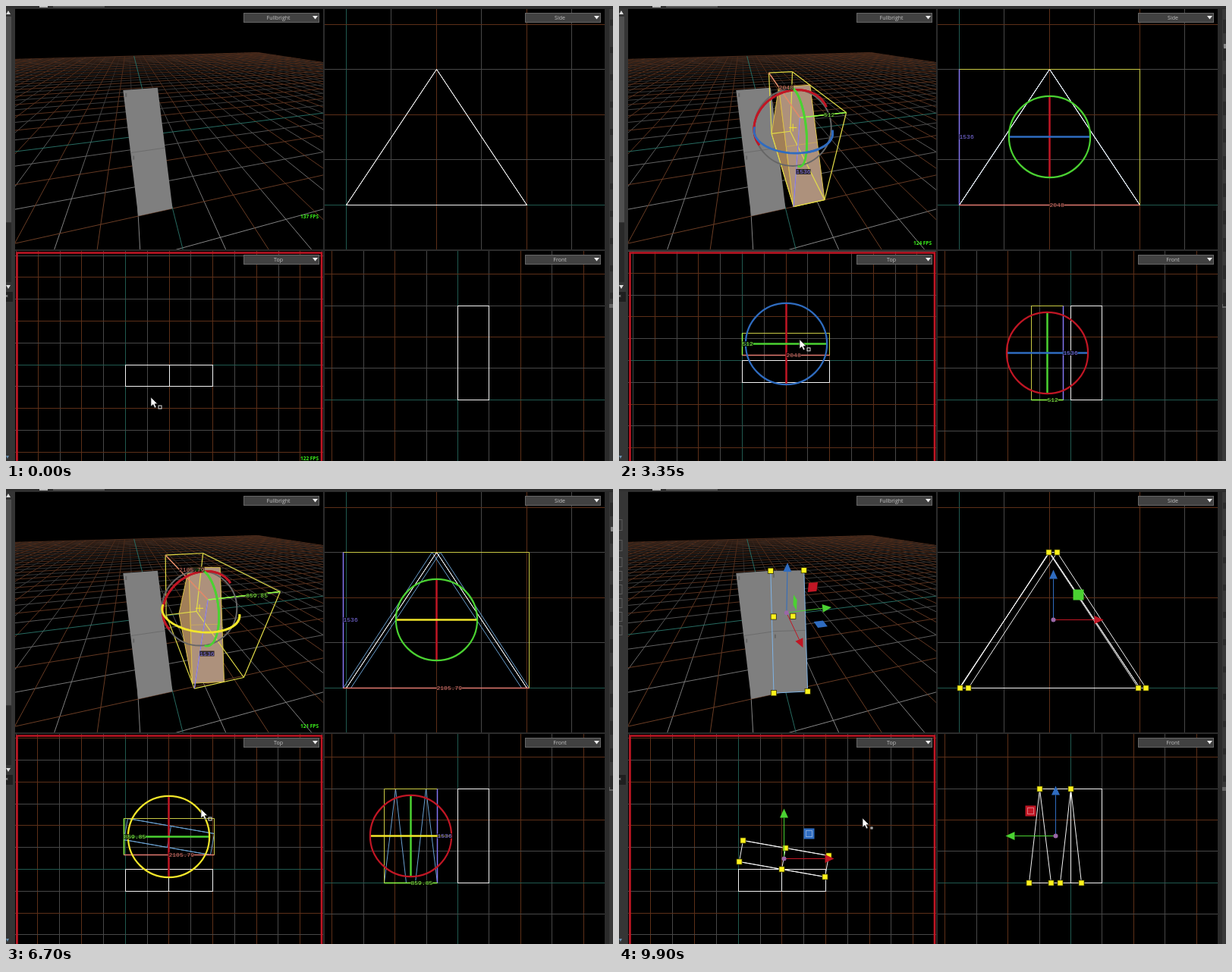
An HTML page with a canvas that plays this animation: 800x600 px, repeating every 9950 ms.

```html
<!DOCTYPE html>
<html>
<head>
<meta charset="utf-8">
<style>
html, body { margin: 0; width: 800px; height: 600px; overflow: hidden; background: #2b2b2b; }
canvas { display: block; }
</style>
</head>
<body>
<canvas id="stage" width="800" height="600"></canvas>
<script>
const g = document.getElementById('stage').getContext('2d');
const LOOP = 9950;
const RED = '#c01624', GREEN = '#4bd232', BLUE = '#2f6cc0', YELLOW = '#f2e62a';
const BOX = '#c9c944', SALMON = '#e27a70', LIME = '#8cff4a', VIOLET = '#8274f0';
const GRAY = '#474747', BROWN = '#5c2f18', TEAL = '#20594f';
const SANS = '7px "Open Sans", sans-serif', MONO = '8px "Liberation Mono", monospace';

// One world unit is one grid cell of 512.
const EDGES = [[0,1],[1,2],[2,0],[3,4],[4,5],[5,3],[0,3],[1,4],[2,5]];
const FACES = [[3,0,2,5],[0,1,2],[4,3,5],[1,4,5,2]];

const part = (t, a, b) => Math.max(0, Math.min(1, (t - a) / (b - a)));
const ease = (t, a, b) => { const k = part(t, a, b); return k * k * (3 - 2 * k); };
const mix = (a, b, k) => a + (b - a) * k;
const add = (a, b, k = 1) => a.map((v, i) => v + b[i] * k);
const snap = v => Math.floor(v) + .5;

// time, x, y
const MOUSE = [[0,191,516],[300,196,511],[950,356,445],[1100,356,445],[1550,222,478],[1700,222,478],
  [2400,365,485],[2650,365,485],[3000,238,476],[3600,238,418],[3750,300,430],[4100,364,458],[4400,364,458],
  [5400,250,416],[5800,250,416],[6600,257,422],[6800,257,422],[7500,122,402],[8100,303,490],[8350,303,490],
  [8850,213,473],[9000,213,473],[9500,215,501],[9800,321,434],[9950,321,434]];

function mouseAt(t) {
  const i = Math.max(1, MOUSE.findIndex(m => m[0] > t));
  const a = MOUSE[i - 1], b = MOUSE[i], k = ease(t, a[0], b[0]);
  return [mix(a[1], b[1], k), mix(a[2], b[2], k)];
}

function toCamera([x, y, z]) {
  const p = 4 - x, h = .9751 * p + .2215 * y;
  return [.1008 - .2215 * p + .9751 * y, -2.34 + .534 * h + .845 * z, 4.5 + .845 * h - .534 * z];
}
const toScreen = ([l, u, d]) => [215 + 201 * l / d, 162.5 - 201 * u / d];
const persp = p => toScreen(toCamera(p));
const side = ([x, , z]) => [448 + 59.5 * x, 262 - 59.5 * z];
const front = ([, y, z]) => [595.5 - 41.4 * y, 519.3 - 41.35 * z];

function path(pts, closed) {
  g.beginPath();
  pts.forEach(p => g.lineTo(p[0], p[1]));
  if (closed) g.closePath();
}
function line(pts, color, width = 1, closed = false) {
  path(pts, closed);
  g.strokeStyle = color;
  g.lineWidth = width;
  g.stroke();
}
function fill(pts, color) {
  path(pts, true);
  g.fillStyle = color;
  g.fill();
}
function rect(x, y, w, h, color) {
  g.fillStyle = color;
  g.fillRect(x, y, w, h);
}
function ring(x, y, r, color, width) {
  g.beginPath();
  g.arc(x, y, r, 0, 7);
  g.strokeStyle = color;
  g.lineWidth = width;
  g.stroke();
}
function text(s, x, y, color, font, align = 'left') {
  g.font = font;
  g.textAlign = align;
  g.textBaseline = 'middle';
  g.fillStyle = color;
  g.fillText(s, x, y);
}
function size(n, [x, y], color) {
  const s = String(+(n * 512).toFixed(2));
  rect(x, y - 3.5, s.length * 4.8, 7, 'rgba(0,0,0,.75)');
  text(s, x, y + .5, color, MONO);
}
function panel(x, y, w, h, draw) {
  g.save();
  g.beginPath();
  g.rect(x, y, w, h);
  g.clip();
  rect(x, y, w, h, '#000');
  draw();
  g.restore();
}

// Wedge vertices, rotated clockwise about its centre and shifted.
function wedge(angle, shift) {
  const c = Math.cos(angle), s = Math.sin(angle);
  return [-1, 0].flatMap(y => [[0, y, 0], [4, y, 0], [2, y, 3]]).map(([x, y, z]) => {
    const a = x - 2, b = y + .5;
    return add([2 + a * c + b * s, -.5 - a * s + b * c, z], shift);
  });
}

function sceneAt(t) {
  const solids = [wedge(0, [0, 0, 0])];
  if (t >= 3000) {
    const turn = Math.round(ease(t, 5800, 6600) * 2) * 5 * Math.PI / 180;
    const slide = ease(t, 9000, 9500);
    solids.push(wedge(turn, [.0868 * slide, 2 * ease(t, 3000, 3600) - 1.0076 * slide, 0]));
  }
  const last = solids[solids.length - 1];
  const lo = [0, 1, 2].map(i => Math.min(...last.map(v => v[i])));
  const hi = [0, 1, 2].map(i => Math.max(...last.map(v => v[i])));
  const k = ease(t, 250, 850), m = ease(t, 3600, 4050);
  const ox = 157.5 + 5 * k - 5.3 * m, oy = 473 - 5.5 * k + 34 * m;
  return {
    t, solids, last, lo, hi, mid: lo.map((v, i) => (v + hi[i]) / 2),
    selected: t >= 1600 && t < 7100,
    points: t >= 8350,
    axisZ: t >= 5400 && t < 7100 ? YELLOW : BLUE,
    top: ([x, y]) => [ox + 28.8 * x, oy - 28.8 * y],
    mouse: mouseAt(t)
  };
}

const tone = k => k === 0 ? TEAL : k % 2 ? GRAY : BROWN;

function flatGrid([ox, oy], unit, x0, x1, y0, y1) {
  for (let k = Math.ceil((x0 - ox) / unit); ox + k * unit < x1; k++) {
    const x = snap(ox + k * unit);
    line([[x, y0], [x, y1]], tone(k));
  }
  for (let k = Math.ceil((y0 - oy) / unit); oy + k * unit < y1; k++) {
    const y = snap(oy + k * unit);
    line([[x0, y], [x1, y]], tone(k));
  }
}

function floorLine(a, b, color) {
  let p = toCamera(a), q = toCamera(b);
  if (p[2] < .1 && q[2] < .1) return;
  if (p[2] > q[2]) [p, q] = [q, p];
  if (p[2] < .1) p = add(p, add(q, p, -1), (.1 - p[2]) / (q[2] - p[2]));
  line([toScreen(p), toScreen(q)], color);
}
function fade(far, mid, near) {
  const f = g.createLinearGradient(0, 62, 0, 300);
  [far, mid, near].forEach((c, i) => f.addColorStop(i / 2, c));
  return f;
}
function floorGrid() {
  const passes = [[k => k % 2, fade('#1c1a19', '#585858', '#858585')],
    [k => k && k % 2 === 0, fade('#4a2a1a', '#5f3520', '#6b3d24')],
    [k => k === 0, '#276b61']];
  for (const [keep, color] of passes)
    for (let k = -32; k <= 32; k++) if (keep(k)) {
      floorLine([k, -32, 0], [k, 32, 0], color);
      floorLine([-32, k, 0], [32, k, 0], color);
    }
}

function handles(pts) {
  for (const [x, y] of pts) {
    rect(x - 4, y - 4, 8, 8, '#333300');
    rect(x - 3.2, y - 3.2, 6.4, 6.4, '#fff31c');
  }
}
function arrow([x, y], [tx, ty], color, width) {
  const n = Math.hypot(tx - x, ty - y), dx = (tx - x) / n, dy = (ty - y) / n;
  const bx = tx - dx * 12, by = ty - dy * 12;
  line([[x, y], [bx, by]], color, width);
  fill([[tx, ty], [bx - dy * 5.5, by + dx * 5.5], [bx + dy * 5.5, by - dx * 5.5]], color);
}
function pivot([x, y]) {
  g.beginPath();
  g.arc(x, y, 3, 0, 7);
  g.fillStyle = '#9a68a8';
  g.fill();
}

// Each 2D view has its own axes and colours for box, ring and arrows.
function flatView(s, map, v) {
  const at = p => map(p).map(snap);
  const draw = (solid, color) => EDGES.forEach(([a, b]) => line([at(solid[a]), at(solid[b])], color));
  if (s.solids[1]) draw(s.solids[1], s.selected ? '#6aa0d0' : '#f4f4f4');
  draw(s.solids[0], s.selected && !s.solids[1] ? '#6aa0d0' : '#f4f4f4');

  const [cx, cy] = at(s.mid);
  if (s.selected) {
    const [ax, ay] = at(s.lo), [bx, by] = at(s.hi);
    const l = Math.min(ax, bx), r = Math.max(ax, bx), up = Math.min(ay, by), low = Math.max(ay, by);
    line([[l, up], [r, up], [r, low], [l, low]], BOX, 1, true);
    const ex = v.right ? r : l;
    line([[ex, up], [ex, low]], v.edgeV, 1.5);
    line([[l, low], [r, low]], v.edgeH, 1.5);
    line([[cx, cy - 53.5], [cx, cy + 53.5]], v.vert, 2.5);
    line([[cx - 53.5, cy], [cx + 53.5, cy]], v.horiz, 2.5);
    ring(cx, cy, 53.6, v.ring, 2.2);
    size(s.hi[v.v] - s.lo[v.v], [ex, cy], v.edgeV);
    size(s.hi[v.h] - s.lo[v.h], [cx, low], v.edgeH);
  }
  if (s.points) {
    const d = v.right ? -1 : 1;
    handles(s.last.map(at));
    arrow([cx, cy], [cx, cy - 66], v.up, 1);
    arrow([cx, cy], [cx + 66 * d, cy], v.out, 1);
    rect(cx + 33 * d - 7, cy - 40, 14, 14, v.plane);
    if (v.plane !== GREEN) {
      g.strokeStyle = '#ffffff66';
      g.lineWidth = 1;
      g.strokeRect(cx + 33 * d - 4, cy - 37, 8, 8);
    }
    pivot([cx, cy]);
  }
}

function solid3d(solid, selected) {
  const p = solid.map(persp);
  FACES.forEach((f, i) => {
    const q = f.map(j => p[j]);
    const area = q.reduce((a, [x, y], j) => {
      const n = q[(j + 1) % q.length];
      return a + x * n[1] - y * n[0];
    }, 0);
    if (area >= 0) return;
    fill(q, (selected ? ['#a48672', '#a17f57', '#8c7358', '#ad917c'] : ['#707070', '#3e3e3e', '#555', '#7f7f7f'])[i]);
    if (selected) line(q, '#dcc04a', 1, true);
    if (i === 3) {
      const half = (a, b) => persp(add(solid[a], solid[b]).map(v => v / 2));
      const l = half(1, 2), r = half(4, 5);
      line([l, r], selected ? '#c8a860' : '#6c6c6c');
      if (!selected) for (const c of [l, q[3]]) rect(c[0] + 3, c[1] + 4, 2, 5, '#666');
    }
  });
}

function box3d({ lo, hi }) {
  const at = (a, b, c) => persp([[lo, hi][a][0], [lo, hi][b][1], [lo, hi][c][2]]);
  for (const a of [0, 1]) for (const b of [0, 1])
    for (const e of [[at(0, a, b), at(1, a, b)], [at(a, 0, b), at(a, 1, b)], [at(a, b, 0), at(a, b, 1)]])
      line(e, '#e2dc48', 1.2);
  line([at(0, 0, 1), at(1, 0, 1)], SALMON, 1.3);
  line([at(1, 0, 1), at(1, 1, 1)], LIME, 1.6);
  line([at(1, 0, 0), at(1, 0, 1)], VIOLET, 1.3);
}

function sizes3d({ lo, hi, mid }) {
  size(hi[0] - lo[0], persp([mid[0], lo[1], hi[2]]), SALMON);
  size(hi[1] - lo[1], persp([hi[0], mid[1], hi[2]]), LIME);
  size(hi[2] - lo[2], persp([hi[0], lo[1], mid[2]]), VIOLET);
}

function rings3d(s) {
  const R = 1.38, c = toCamera(s.mid), [x, y] = toScreen(c);
  ring(x, y, R * 201 / c[2], '#666', 2);
  const arc = (u, w, color) => {
    let run = [];
    for (let i = 0; i <= 144; i++) {
      const a = i * Math.PI / 36, o = [0, 0, 0];
      o[u] = R * Math.cos(a);
      o[w] = R * Math.sin(a);
      const p = toCamera(add(s.mid, o));
      const facing = c.reduce((n, v, j) => n + v * (p[j] - v), 0) <= 0.05;
      if (facing) run.push(toScreen(p));
      else { if (run.length > 1) line(run, color, 2.8); run = []; }
    }
  };
  arc(1, 2, RED);
  arc(0, 2, GREEN);
  arc(0, 1, s.axisZ);
  line([[x - 5, y], [x + 5, y]], YELLOW);
  line([[x, y - 5], [x, y + 5]], YELLOW);
}

function move3d(s) {
  const p = s.last.map(persp);
  line([p[1], p[4], p[5]], '#7fb4e6');
  line([p[1], p[2]], '#7fb4e6');
  handles(p);
  const colors = [RED, GREEN, BLUE], c = persp(s.mid);
  const off = (i, k, j = 0, m = 0) => {
    const o = [0, 0, 0];
    o[i] += k;
    o[j] += m;
    return persp(add(s.mid, o));
  };
  for (const i of [0, 1, 2]) {
    const j = (i + 1) % 3, k = (i + 2) % 3;
    fill([[.72, .72], [1.04, .72], [1.04, 1.04], [.72, 1.04]].map(([a, b]) => off(j, a, k, b)), colors[i]);
    arrow(c, off(i, 1.73), colors[i], 1);
  }
  pivot(c);
}

function dropdown(x, y, label) {
  rect(x, y, 100, 13, '#666');
  rect(x + 1, y + 1, 98, 11, '#414141');
  text(label, x + 46, y + 7, '#c4c4c4', SANS, 'center');
  fill([[x + 91, y + 4], [x + 98, y + 4], [x + 94.5, y + 8.5]], '#eee');
}
const fps = (n, y) => text(n + ' FPS', 400, y, '#3cf01c', 'bold 6.5px "Open Sans", sans-serif', 'center');

function chrome(s) {
  rect(0, 0, 800, 600, '#2b2b2b');
  rect(0, 0, 800, 3, '#303030');
  rect(44, 0, 11, 2, '#bbb');
  rect(62, 0, 68, 2, '#5a5a5a');
  rect(0, 3, 12, 597, '#353535');
  if (s.t < 7200) {
    rect(0, 14, 7, 271, '#505050');
    rect(0, 286, 7, 78, '#292929');
    fill([[0, 11], [6, 11], [3, 6]], '#ddd');
    fill([[0, 368], [6, 368], [3, 373]], '#ddd');
  } else {
    g.strokeStyle = '#5c5c5c';
    g.lineWidth = 1;
    for (const [y, h] of [[40, 14], [67, 14], [90, 12], [108, 12], [126, 12], [144, 12], [162, 12], [180, 12]])
      g.strokeRect(-6, y + .5, 10, h);
  }
  rect(0, 377, 9, 13, '#1f1f1f');
  text('×', 1, 383, '#ccc', SANS, 'center');
  fill([[0, 593], [4, 593], [2, 597]], '#6a90b0');
  rect(795, 4, 5, 596, '#383838');
  rect(795, 393, 5, 5, '#666');
  for (let y = 18; y < 380; y += 36) rect(796, y, 4, s.selected ? 18 : 8, '#2a2a2a');
  if (s.selected) rect(797, 50, 3, 6, '#888');
}

function cursor([x, y], t) {
  const p = [[0, 0], [0, 12], [3, 9.5], [5, 14], [7, 13], [5, 8.8], [8.5, 8.5]].map(([a, b]) => [x + a, y + b]);
  fill(p, '#fff');
  line(p, '#222', .7, true);
  g.strokeStyle = '#ddd';
  g.lineWidth = 1;
  const w = t > 7500 ? 2 : 4;
  g.strokeRect(x + 12 - w / 2, y + 13 - w / 2, w, w);
}

function frame(now) {
  const t = Math.floor(now % LOOP / 50) * 50, s = sceneAt(t);
  chrome(s);

  panel(12, 4, 406, 317, () => {
    floorGrid();
    s.solids.forEach(o => solid3d(o, s.selected && o === s.last));
    if (s.selected) {
      box3d(s);
      rings3d(s);
      sizes3d(s);
    }
    if (s.points) move3d(s);
    else if (t < 1600) fps(137, 278);
    else fps(t < 3000 ? 128 : t < 5500 ? 124 : 121, 313);
    dropdown(313, 9, 'Fullbright');
  });

  panel(420, 4, 369, 317, () => {
    flatGrid(side([0, 0, 0]), 59.5, 420, 789, 4, 321);
    flatView(s, side, { h: 0, v: 2, edgeV: VIOLET, edgeH: SALMON, vert: RED, horiz: s.axisZ, ring: GREEN,
      up: BLUE, out: RED, plane: GREEN });
    dropdown(684, 9, 'Side');
  });

  panel(12, 323, 406, 277, () => {
    flatGrid(s.top([0, 0]), 28.8, 12, 418, 323, 600);
    flatView(s, s.top, { h: 0, v: 1, edgeV: LIME, edgeH: SALMON, vert: RED, horiz: GREEN, ring: s.axisZ,
      up: GREEN, out: RED, plane: BLUE });
    if (t > 7500 && t < 8350) {
      const [x, y] = s.mouse;
      g.setLineDash([5, 4]);
      line([[121.5, 402], [x, 402], [x, y - .5], [121.5, y - .5]], '#d6d64c', 1.2, true);
      g.setLineDash([]);
    }
    line([[14.5, 602], [14.5, 325.5], [416, 325.5], [416, 602]], RED, 2.6);
    if (t < 1600) fps(t < 500 ? 122 : 137, 597);
    dropdown(313, 328, 'Top');
    cursor(s.mouse, t);
  });

  panel(420, 323, 369, 277, () => {
    flatGrid(front([0, 0, 0]), 41.4, 420, 789, 323, 600);
    flatView(s, front, { h: 1, v: 2, right: true, edgeV: VIOLET, edgeH: LIME, vert: GREEN, horiz: s.axisZ, ring: RED,
      up: BLUE, out: GREEN, plane: RED });
    dropdown(684, 328, 'Front');
  });

  requestAnimationFrame(() => frame(performance.now() - start));
}
const start = performance.now();
frame(0);
</script>
</body>
</html>
```
